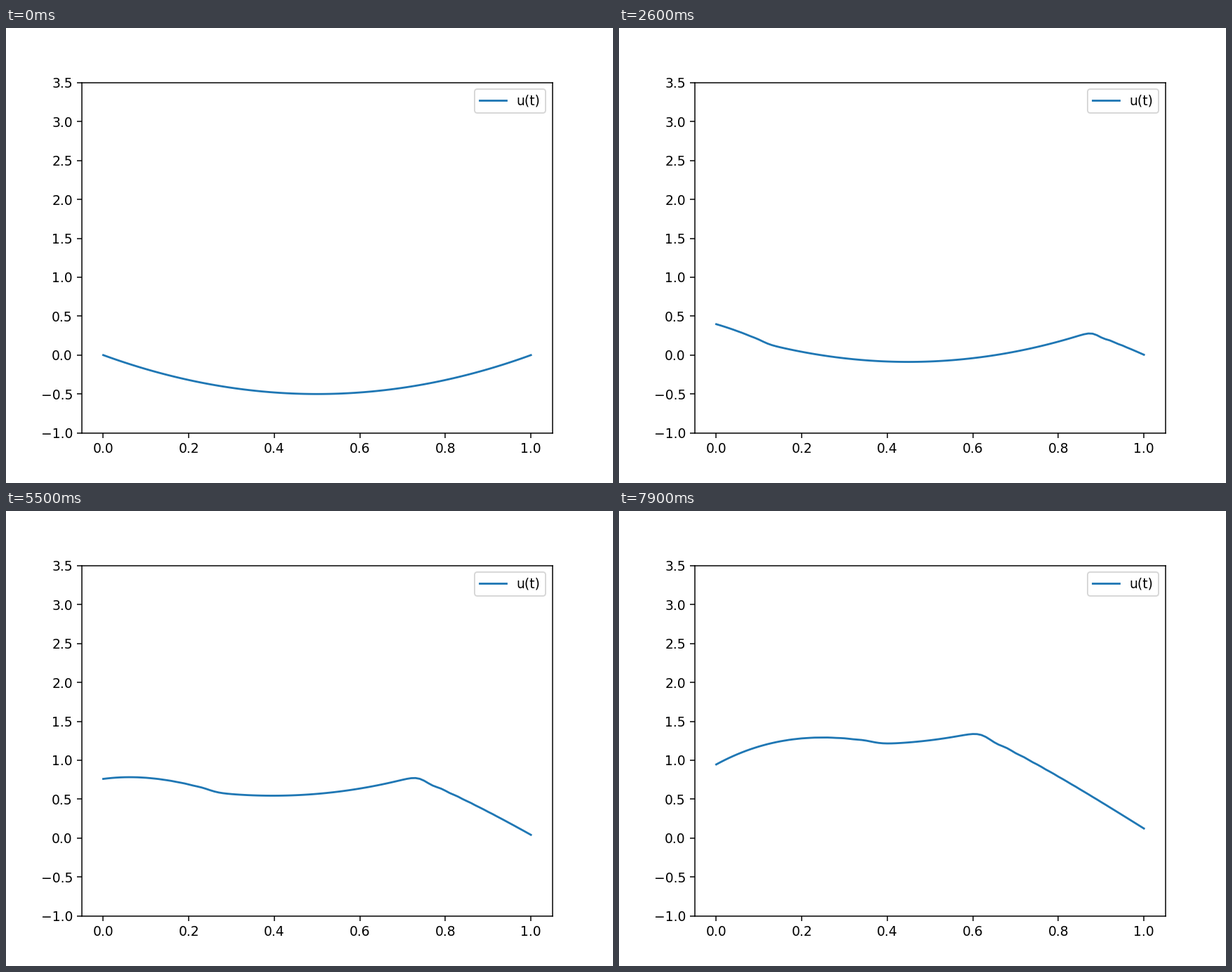
A matplotlib script for the animation above (8 s loop, 864 by 648 pixels).

```python
import numpy as np
import matplotlib.pyplot as plt
from matplotlib.animation import FuncAnimation

STEPS = 80
DX, DT = 0.01, 0.005
FORCE = 5.0

x = np.linspace(0, 1, 101)


def solve():
    """Explicit scheme for u_tt = u_xx + FORCE with driven ends."""
    r2 = (DT / DX) ** 2
    u = np.zeros((STEPS, x.size))
    u[0] = 2 * x * (x - 1)
    u[1] = u[0] + DT * (1 + np.exp(x))
    for n in range(1, STEPS):
        t = n * DT
        if n > 1:
            a, b = u[n - 1], u[n - 2]
            lap = a[2:] - 2 * a[1:-1] + a[:-2]
            u[n, 1:-1] = 2 * a[1:-1] - b[1:-1] + r2 * lap + DT**2 * FORCE
        u[n, 0] = np.sin(np.pi * t)
        u[n, -1] = 2 * t**3
    return u


u = solve()

fig, ax = plt.subplots(figsize=(6.4, 4.8), dpi=135)
line, = ax.plot(x, u[0], label="u(t)")
ax.set_xlim(-0.05, 1.05)
ax.set_ylim(-1, 3.5)
ax.legend(loc="upper right")


def update(n):
    line.set_ydata(u[n])
    return line,


anim = FuncAnimation(fig, update, frames=STEPS, interval=100,
                     repeat=True, repeat_delay=0)
plt.show()
```
